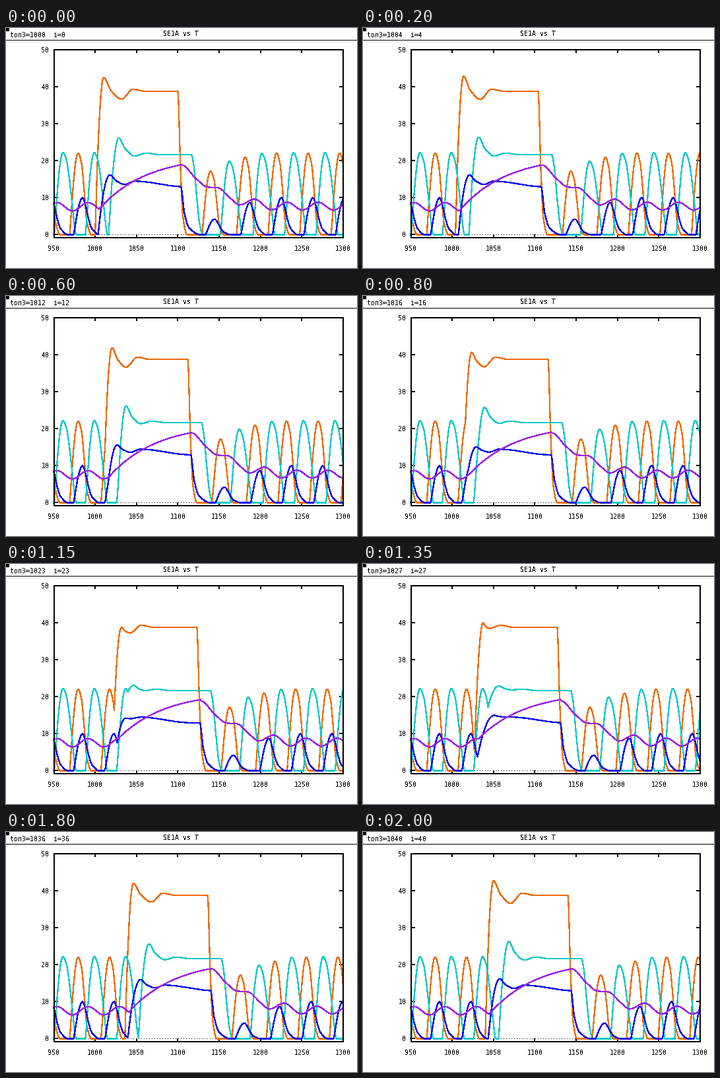
A matplotlib script that plays this animation: 532x364 px, repeating every 2050 ms.

```python
import numpy as np
import matplotlib as mpl
import matplotlib.pyplot as plt
from matplotlib.animation import FuncAnimation
from matplotlib.patches import Rectangle

W, H, DPI = 532, 364, 100
STEPS, INTERVAL = 41, 50
PX = 72 / DPI                      # one pixel in points
LEFT, RIGHT, TOP, BOTTOM = 72, 510.5, 33, 318
SCALE = (RIGHT - LEFT) / 350       # pixels per time unit
PERIOD = 47.45                     # free-running cycle, in pixels
PULSE = 100 * SCALE
PHASES = [0, 8, 16, 23, 27, 32]    # onsets at which responses are given

mpl.rcParams["text.antialiased"] = False


def px_x(t):
    return LEFT + (t - 950) * SCALE


def px_y(v):
    return 313 - 5.6 * np.asarray(v)


def smooth(points, x):
    """Monotone cubic through the points, flat beyond both ends."""
    px, py = np.array(points, float).T
    h = np.diff(px)
    d = np.diff(py) / h
    prod = d[1:] * d[:-1]
    same = prod > 0
    m = np.zeros(len(px))
    m[1:-1] = np.where(same, 2 * prod / np.where(same, d[1:] + d[:-1], 1), 0)
    k = np.clip(np.searchsorted(px, x) - 1, 0, len(h) - 1)
    u = np.clip((x - px[k]) / h[k], 0, 1)
    return ((1 + 2 * u) * (1 - u) ** 2 * py[k] + u * (1 - u) ** 2 * h[k] * m[k]
            + u * u * (3 - 2 * u) * py[k + 1] + u * u * (u - 1) * h[k] * m[k + 1])


class Cell:
    """Free cycle, then a delayed response to the pulse, then recovery."""

    def __init__(self, color, first, delay, rise, fall, overshoot, bump,
                 plateau, settle, decay, rebounds):
        self.color, self.first, self.delay = color, first, delay
        self.rise, self.fall, self.height = rise, fall, fall[0][1]
        self.overshoot = np.array(overshoot).T   # peak x, y and dip x, y
        self.bump, self.plateau, self.settle = bump, plateau, settle
        self.decay = [(delay, plateau), *decay]
        last = rebounds[-1][0]
        self.rebounds = rebounds + [(last + 47.8 * k, self.height) for k in (1, 2, 3)]

    def hump(self, x):
        u = np.clip(-x / self.rise, 0, 1)
        return np.where(x < 0, self.height * (1 - u * u) ** 1.2, smooth(self.fall, x))

    def free(self, x):
        return sum(self.hump(x - self.first - k * PERIOD) for k in range(-1, 4))

    def driven(self, s, i, start):
        px, py, dx, dy = (np.interp(i, PHASES, row, period=PERIOD / SCALE)
                          for row in self.overshoot)
        gap, top = self.bump
        tail = smooth([(px, py), (.6 * px + .4 * dx, .4 * py + .6 * dy), (dx, dy),
                       (dx + gap, top), (dx + gap + self.settle, self.plateau)], s)
        u = np.clip((s - self.delay) / (px - self.delay), 0, 1)
        return np.where(s < px, py - (py - start) * (1 - u) ** 2, tail)

    def recovery(self, s):
        return smooth(self.decay, s) + sum(
            amp / self.height * self.hump(s - c) for c, amp in self.rebounds)

    def __call__(self, x, i):
        on = px_x(1000 + i)
        s = x - on
        start = self.free(np.array([on + self.delay]))[0]
        y = np.where(s < self.delay, self.free(x), self.driven(s, i, start))
        return np.where(s < self.delay + PULSE, y, self.recovery(s - PULSE))


class Adaptation:
    """Slow variable: ripple, exponential climb, decay back to the ripple."""
    color, delay = "#9a24e6", 6
    decay = [(6, 18.9), (27, 15.3), (45, 12.9), (61, 12.7), (80, 9.8),
             (94, 8.05), (116, 9.65), (142, 6.7)]

    def free(self, x):
        return 7.58 + 1.14 * np.cos(2 * np.pi * (x - 124) / PERIOD)

    def recovery(self, s):
        ripple = 7.75 - 1.05 * np.cos(2 * np.pi * (s - 142) / 47)
        return np.where(s < 142, smooth(self.decay, s), ripple)

    def __call__(self, x, i):
        on = px_x(1000 + i)
        s = x - on
        climb = 21.5 - (21.5 - self.free(on + 6)) * np.exp(-(s - 6) / 71.4)
        y = np.where(s < self.delay, self.free(x), climb)
        return np.where(s < self.delay + PULSE, y, self.recovery(s - PULSE))


orange = Cell(
    "#ec6c08", first=109, delay=0, rise=13,
    fall=[(0, 22.1), (5, 19.3), (9, 12), (13, 3.5), (20, 0)],
    overshoot=[(13, 42.6, 40, 36.7), (11.5, 43.2, 35, 36.6), (9.5, 40.7, 28.5, 36.8),
               (11, 38.8, 24, 37.3), (13, 40, 22.5, 38.5), (12.5, 41, 41, 37.7)],
    bump=(17, 39.4), plateau=38.8, settle=20,
    decay=[(4, 18), (8, 4.5), (14, 0)],
    rebounds=[(49.7, 17.2), (102, 21)])

cyan = Cell(
    "#10c8c4", first=86, delay=20.5, rise=13.5,
    fall=[(0, 22.2), (5, 20.3), (9, 16), (14, 8), (20, 0)],
    overshoot=[(36, 26.2, 60, 21.3), (34.5, 26.6, 57, 21.3), (29, 25.8, 51, 21.5),
               (30, 23.1, 47, 21.7), (37, 23, 56, 21.9), (37, 24.4, 62, 21.6)],
    bump=(17, 22.1), plateau=21.7, settle=20,
    decay=[(24, 19), (29, 9.5), (33, 3), (38, 0)],
    rebounds=[(78, 19.9), (127.5, 22)])

blue = Cell(
    "#0a0ae6", first=115.9, delay=4.5, rise=14,
    fall=[(0, 10), (5, 7.3), (9, 4.1), (14, 1.6), (25, 0)],
    overshoot=[(22.5, 16.2, 45, 13.6), (20, 16.2, 41, 13.6), (16.5, 15.1, 36, 13.7),
               (17, 14.2, 25, 14.1), (30, 15, 45, 14.55), (26, 15.6, 46, 14.2)],
    bump=(15, 14.5), plateau=13, settle=75,
    decay=[(10, 5.8), (17, 1.9), (34, 0)],
    rebounds=[(56, 4.2), (109.5, 8.7)])

CURVES = [orange, cyan, blue, Adaptation()]

fig = plt.figure(figsize=(W / DPI, H / DPI), dpi=DPI, facecolor="white")
ax = fig.add_axes([0, 0, 1, 1])
ax.set(xlim=(-.5, W - .5), ylim=(H - .5, -.5))
ax.axis("off")


def stroke(xs, ys, color="black", width=1.0, **kw):
    return ax.plot(xs, ys, color=color, lw=width * PX, antialiased=False, **kw)[0]


def label(x, y, text, ha="left"):
    return ax.text(x, y, text, family="DejaVu Sans Mono", size=10 * PX,
                   ha=ha, va="baseline", color="black")


# Header
ax.add_patch(Rectangle((-.5, -.5), 5, 5, color="black", lw=0))
stroke([-1, W], [18, 18])
label(238, 12, "SE1A vs T")
status = label(5, 14, "")

# Frame, ticks and zero line
stroke([LEFT, RIGHT, RIGHT, LEFT, LEFT], [TOP, TOP, BOTTOM, BOTTOM, TOP],
       width=2, zorder=4)
for v in range(0, 51, 10):
    y = px_y(v)
    stroke([LEFT, LEFT + 5], [y, y], width=2)
    stroke([RIGHT - 5, RIGHT], [y, y], width=2)
    label(65, y + 4, str(v), "right")
for t in range(950, 1301, 50):
    x = px_x(t)
    stroke([x, x], [TOP, TOP + 4], width=2)
    stroke([x, x], [BOTTOM - 4, BOTTOM], width=2)
    label(x, 338, str(t), "center")
stroke([LEFT, RIGHT], [313, 313], ls=(0, (1, 4)), dash_capstyle="butt")

xs = np.arange(LEFT, RIGHT + .25, .5)
lines = [stroke([], [], c.color, 1.25, zorder=3) for c in CURVES]


def update(i):
    status.set_text(f"ton3={1000 + i}  i={i}")
    for line, curve in zip(lines, CURVES):
        line.set_data(xs, px_y(curve(xs, i)))
    return [status, *lines]


anim = FuncAnimation(fig, update, frames=STEPS, interval=INTERVAL, repeat=True)
plt.show()
```
